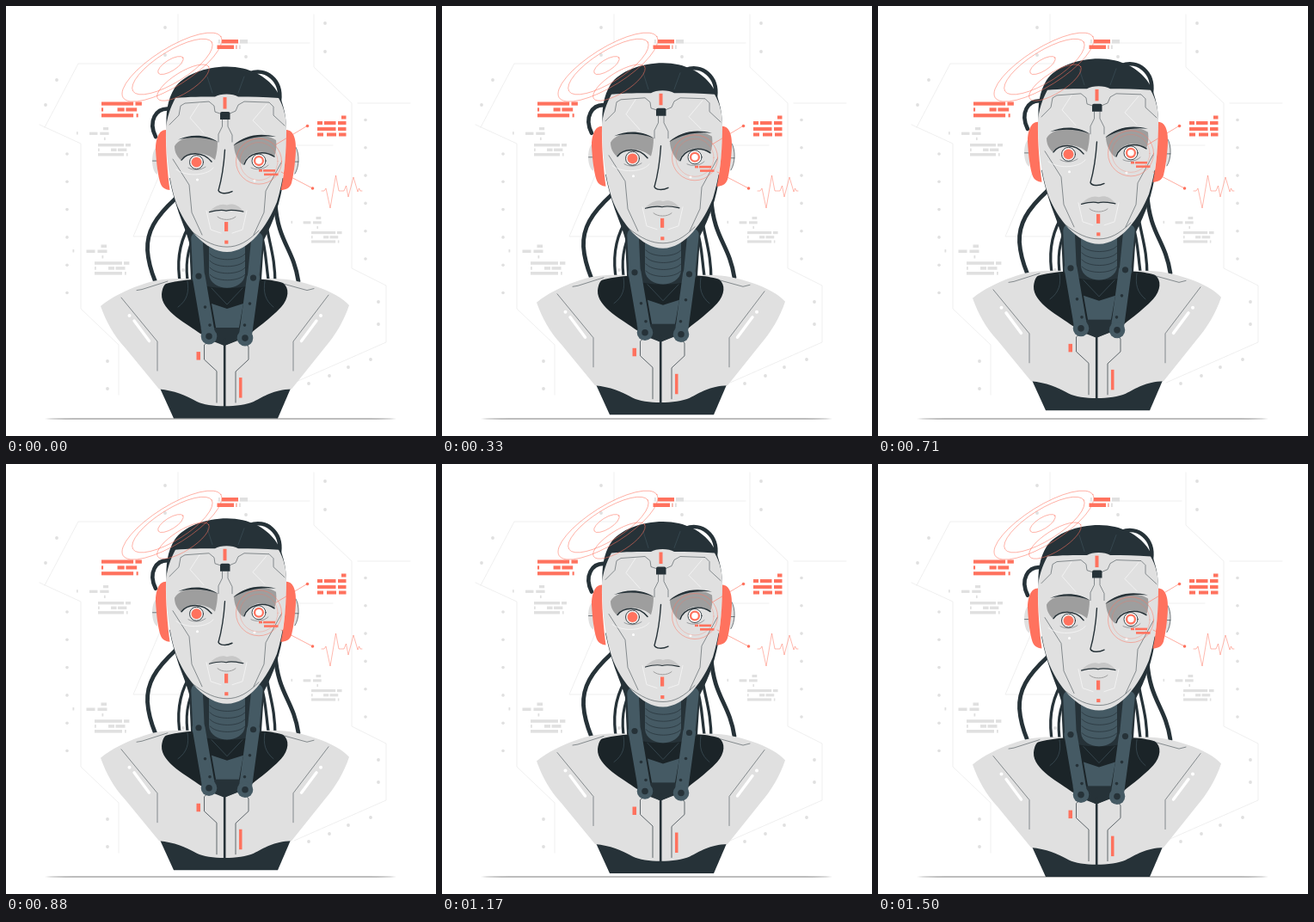
Recreate the animation shown at these times as an HTML page. Size 500 px wide and 500 px high, loop 1.54 s.

```html
<!DOCTYPE html>
<html lang="en">
<head>
<meta charset="utf-8">
<title>Android bust</title>
<style>
html, body { margin: 0; width: 100%; height: 100%; overflow: hidden; background: #fff; }
svg { display: block; width: 100vw; height: 100vh; }
.l { fill: none; stroke-linecap: round; stroke-linejoin: round; }
</style>
</head>
<body>
<svg id="stage" viewBox="0 0 500 500"></svg>
<script>
const INK = '#263238', DEEP = '#1b2428', STEEL = '#455a64', SKIN = '#e0e0e0',
      PALE = '#ebebeb', RED = '#ff725e', SHADE = '#9e9e9e', WHITE = '#fafafa';
const LOOP = 1540, LOW = 1493, RISE = 10;

const fill = (d, c) => `<path d="${d}" fill="${c}"/>`;
const line = (d, c, w = 0.8) => `<path class="l" d="${d}" stroke="${c}" stroke-width="${w}"/>`;
const rect = (x, y, w, h, c) => `<rect x="${x}" y="${y}" width="${w}" height="${h}" fill="${c}"/>`;
const dot = (x, y, r, c) => `<circle cx="${x}" cy="${y}" r="${r}" fill="${c}"/>`;
const ring = (x, y, r, c, w) => `<circle class="l" cx="${x}" cy="${y}" r="${r}" stroke="${c}" stroke-width="${w}"/>`;
const oval = (x, y, a, b) =>
  `<ellipse class="l" cx="${x}" cy="${y}" rx="${a}" ry="${b}" transform="rotate(-32 ${x} ${y})" stroke="${RED}" stroke-width=".5"/>`;
const column = (x, y, n, step) => Array.from({ length: n }, (_, i) => dot(x, y + i * step, 1.8, SKIN)).join('');

// Three rows of bars that read as a block of data
function rows(x, y, s, c) {
  const bars = [[0, 0, 32], [34, 0, 6.4], [0, 1, 1.8], [16, 1, 7], [24.5, 1, 11], [0, 2, 32], [35, 2, 1.8]];
  return bars.map(([bx, r, w]) => rect(x + bx * s, y + r * 5.9 * s, w * s, 3.6 * s, c)).join('');
}

// Loose bars above a block
function crumbs(x, y, s) {
  const bars = [[33, 0, 6.5], [0, 5.5, 1.8], [16, 6, 10], [29, 6, 11], [34, 12.5, 1.8]];
  return bars.map(([bx, by, w]) => rect(x + bx * s, y + by * s, w * s, 3.5 * s, SKIN)).join('');
}

function backdrop() {
  return line('M39 138L87 160V352L131 394V452M45 141L84 67H205M200 10V43M246 43H353M358 10V71L402 113V305L442 325V391L335 438M409 113H470M182 188L148 268H215M338 162H380', PALE, 0.8)
    + column(71, 172, 6, 32.3) + column(418, 132.5, 6, 32.3)
    + [[185, 25], [185, 57], [371, 20], [371, 53], [59, 86], [46, 115], [279, 59], [433, 344], [433, 370],
       [424, 411], [398, 420], [376, 430], [352, 439], [118, 413], [118, 445], [206, 307]]
      .map(([x, y]) => dot(x, y, 1.9, SKIN)).join('')
    + crumbs(82, 141, 0.94) + rows(107, 160, 0.94, SKIN)
    + crumbs(77.5, 277.5, 1) + rows(103, 297.2, 1, SKIN)
    + crumbs(331.5, 245, 0.88) + rows(355, 262, 0.88, SKIN)
    + fill('M45 480Q60 478.9 80 478.9H420Q440 478.9 454 480Q440 481 420 481H80Q60 481 45 480Z', '#bdbdbd');
}

function cables() {
  return line('M197 224C173 246 163.500 263 164.500 284C165.500 298 169 309 173.500 320M313 228C316 275 334 281 340 320', INK, 4.8)
    + line('M212 257C202 275 198 299 203 325M220 266C210 284 208 302 212 325M302 250C307 280 313 292 313 325M296 262C303 285 302 300 306 325', INK, 3.3)
    + line('M190 119.500C174 118 165 134 174 152M283 78.500C302 71 321 86 318 110', INK, 4.6);
}

function torso() {
  return fill('M177 440L195 479.4H316L333 440Z', INK)
    + fill('M110 349C122 339 140 330 155 325C170 319 185 317 200 317H310C330 317 345 321 360 326C378 332 392 340 399 348C393 366 383 383 370 398L332 445.500C311 446 300 454 288 460C272 467 236 467 222 460C208 452 196 447.500 178 445.500L139 398C125 383 116 366 110 349Z', SKIN)
    + fill('M186 323C205 318 220 317 254 317C290 317 305 317 322 322C330 328 329 340 320 350C306 365 290 375 282 383L254 395L226 381C212 370 180 355 181 335C182 327 184 324 186 323Z', DEEP)
    + fill('M226 374H284L280 385L254 395L228 385Z', INK)
    + line('M254.2 388V466', INK, 2.6)
    + line('M236 389L230.500 394V411L245 424.500V461M275 390L282 396V411L267 425V461', INK, 0.7)
    + line('M134 339L176 390V424M375 336L334 390V424M188 320L158 329.500L152 330.500M319 322L350 330.500L358 328.500', INK, 0.5)
    + dot(143.500, 360, 2, '#fff') + dot(366, 360, 2, '#fff')
    + line('M149 366L166.500 389.500M361 366L343.500 389.500', '#fff', 3.4)
    + rect(221.500, 402, 4.500, 9.500, RED) + rect(271, 432, 3.500, 23.500, RED);
}

function piston(top, joint, end, dots) {
  const [jx, jy] = joint, [ex, ey] = end;
  return line(`M${top}L${jx} ${jy}`, STEEL, 13.5)
    + line(`M${jx} ${jy}L${ex} ${ey}`, STEEL, 15)
    + dot(ex, ey, 9.3, STEEL) + dot(ex, ey, 3.8, INK) + dot(jx, jy, 3.6, INK)
    + dots.map(([x, y]) => dot(x, y, 1.8, INK)).join('');
}

function neck() {
  const ribs = [288, 296, 304, 312].map(y => `M237 ${y}C244 ${y + 9} 271 ${y + 9} 278 ${y}`).join('');
  return fill('M190 200C198 240 208 255 213 275L215 318C225 325 240 328 257 328C274 328 290 325 297 318L300 272C311 250 319 230 323 200Z', INK)
    + fill('M239 346L257 352L276 346L271 374H244Z', STEEL)
    + line('M239 328L257 347L275 328M200 350C211 342 213 332 211 320M311 350C301 342 299 332 301 320', STEEL, 0.6)
    + fill('M236 265V312C238 333 276 333 278 312V265Z', STEEL)
    + line(ribs, INK, 0.7)
    + piston('222 270', [224, 314], [236, 384], [[231.500, 350], [237, 371]])
    + piston('292 270', [287.500, 316], [278, 386], [[283.500, 346], [277.500, 371]]);
}

function skull() {
  return fill('M187 145C185 125 188 108 196 95.500C206 80 232 70.400 257 70.400C283 70.400 303 82 313 96C321 107 326 125 326 145Z', INK)
    + line('M234 82L240 101M277 82L270 101', STEEL, 0.5)
    + fill('M176 163C168 168 168 192 176 196ZM335 163C342.500 168 342 190 335 196Z', SKIN)
    + line('M170.500 180H175M337 164C341.500 172 341 187 336 195M336 181H340', INK, 0.6)
    + fill('M197 107C212 105.500 230 105.500 243 105.500C249 101.500 264 101.500 270 105.500C285 105.500 300 105.500 317 107C323 117 326 130 326 143C327 175 322 205 315 228C304 255 283 286 257 286C232 286 208 257 197.500 228C190 205 186 175 186 143C187 130 191 118 197 107Z', SKIN)
    + fill('M186 144C177 144 174 156 174 167C175 185 177 198 179.500 206C181.500 212 186 213.500 190.500 214C188 195 185.500 168 186 144ZM326 144C335 144.500 337.500 156 337 168C336 186 334 198 332 206C330 212 325 214 319.500 214C324 195 326 168 326 144Z', RED);
}

function circuits() {
  return line('M249 125L243 123L242 116L236 111L208 113L203 116L201 127L190 138M260 125L267 122L270 115L277 111L306 112L311 117V127L324 139', INK, 0.5)
    + line('M251.500 132V140L247 149V158M258 132V140L263 150V158', INK, 0.5)
    + line('M194 178L213 208L216 240L228 266M320 182L302 215L300 240L288 266', INK, 0.5)
    + line('M216 262C232 275 244 280 257 280C270 280 281 274 294 261', INK, 0.5)
    + line('M225 113L214 130L230 148M303 114L287 133L301 147M233 238L238 260L250 264M280 238L275 260L263 264M198 190C212 200 236 196 241 188', WHITE, 0.7)
    + dot(222.500, 202, 1.500, '#fff') + dot(289, 203, 1.500, '#fff')
    + rect(252.500, 106, 4, 13.500, RED)
    + fill('M249 125Q249 123 251 123H258.500Q260.500 123 260.500 125V132H249Z', INK)
    + rect(254, 251, 4.200, 11, RED) + rect(254.200, 272.500, 4.200, 4, RED);
}

function features() {
  return fill('M196 163C202 150 232 148 246 158C246 165 245 172 243 179C238 174 228 170 219 171C210 172 206 176 203 179C198 174 196 169 196 163Z', SHADE)
    + fill('M265 161C280 148 305 149 314 156C315 163 314 170 312 175C305 170 295 168 289 171C282 173 277 179 276 185C269 180 265 170 265 161Z', SHADE)
    + fill('M200 155.500C214 149 232 148.500 246.500 158C232 152 214 151.500 200 155.500ZM264 162.500C277 150 295 147 314 152C296 150 279 153.500 264 162.500Z', INK)
    + dot(221.500, 181.500, 8.300, '#eee') + dot(294, 180, 8.300, '#fff')
    + ring(221.500, 181.500, 8, INK, 0.9) + dot(221.500, 181.500, 5.900, RED)
    + ring(294, 180, 8, INK, 0.9) + ring(294, 180, 4.900, RED, 2.300)
    + line('M204 179C211 169.500 229 168.500 239 181M277 184C281 171 299 166.500 312 175', INK, 1.500)
    + line('M212 188C218 191.500 226 191 232 187M285 188C291 191 300 190 305 185', INK, 0.4)
    + line('M254.500 167C253 190 250 204 247 214.500C248.500 218 256 219 263 215.500', INK, 1.400)
    + fill('M236 239C244 231.500 251 229 257 231.500C263 229 270 231 276 238.500C268 239 262 236 256 238C250 236 243 239 236 239Z', '#c7c7c7')
    + line('M236.500 239.500C244 237.500 250 236 256 238C262 236 268 237.500 276 239', INK, 1.200)
    + line('M246 245C251 249.500 262 249.500 267 245', SHADE, 1);
}

function target() {
  return ring(294, 180.500, 26.500, RED, 0.5) + ring(294, 180.500, 22, RED, 0.3)
    + rect(294, 190, 4, 2.600, RED) + rect(299, 190, 14, 2.600, RED) + rect(300, 194.500, 16.500, 2.600, RED);
}

function overlay() {
  const tags = [[390, 127.500, 5.500], [362, 134, 6], [370, 134, 13.500], [386, 134, 9.500], [362, 141, 21.500],
    [386, 141, 9.500], [362, 147.500, 7], [373, 147.500, 11], [387, 147.500, 8.500]];
  return oval(193, 71, 67, 22) + oval(193.500, 70.500, 54, 18) + oval(191.500, 69, 17, 6.500) + oval(206, 89, 35, 12)
    + line('M314 161L350 139.500M320 193L356.500 212', RED, 0.6)
    + dot(350.500, 139.500, 1.800, RED) + dot(356.500, 212, 1.800, RED)
    + line('M367 215H370L372 212L377 235L383.500 197L387 215H393L395.500 209L398 222L404 199L409 216L410.500 212L412 215H414', RED, 0.5)
    + rows(111, 111.500, 1.160, RED)
    + tags.map(([x, y, w]) => rect(x, y, w, 4, RED)).join('')
    + rect(247, 39, 1.800, 4.500, SKIN) + rect(251, 39, 19, 4.500, RED) + rect(272, 39, 9, 4.500, SKIN)
    + rect(245.500, 45.500, 19.500, 4.500, RED) + rect(267, 45.500, 1.800, 4.500, '#f7b5aa') + rect(271, 45.500, 1.800, 4.500, SKIN);
}

document.getElementById('stage').innerHTML = backdrop()
  + '<g id="bust">' + cables() + torso() + neck() + skull() + circuits() + features() + target() + '</g>'
  + overlay();
const bust = document.getElementById('bust');

// Steady rise and fall
function draw(ms) {
  const p = ((ms - LOW + LOOP) % LOOP) / LOOP;
  const lift = RISE * (1 - Math.abs(1 - 2 * p));
  bust.setAttribute('transform', `translate(0 ${(0.7 - lift).toFixed(2)})`);
}

const start = performance.now();
function tick() {
  draw((performance.now() - start) % LOOP);
  requestAnimationFrame(tick);
}
tick();
</script>
</body>
</html>
```
